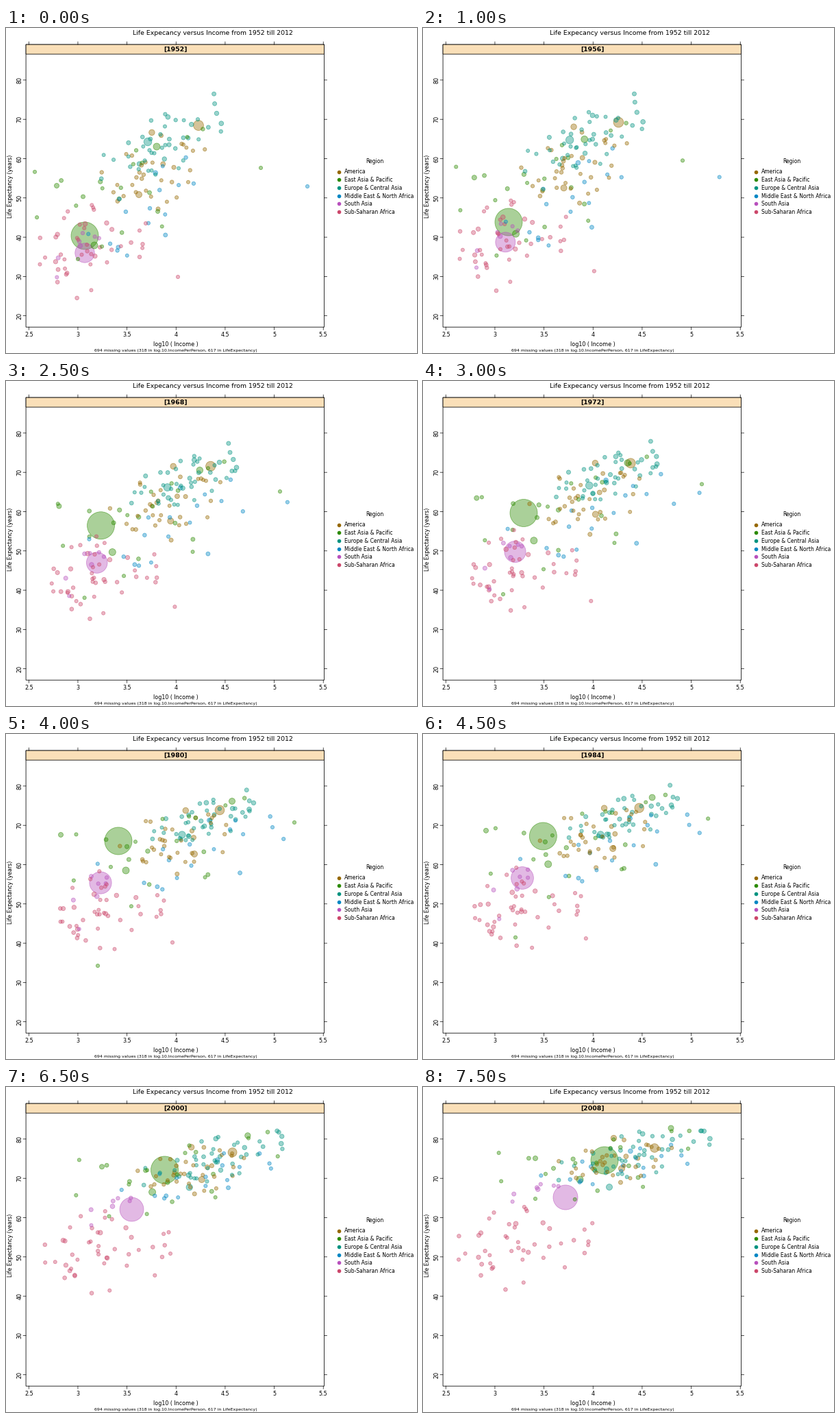
A matplotlib script for the animation above (8 s loop, 600 by 474 pixels).

```python
import numpy as np
import matplotlib.pyplot as plt
from matplotlib.animation import FuncAnimation
from matplotlib.colors import to_rgba
from matplotlib.patches import Rectangle

W, H, DPI = 600, 474, 100
PT = 72 / DPI  # points per pixel
FIRST, LAST, STEP = 1952, 2008, 4

plt.rcParams["font.family"] = "DejaVu Sans"
rng = np.random.default_rng(8)

AM, EA, EU = "#966900", "#2c8a00", "#009380"
ME, SA, AF = "#0087c4", "#b850bd", "#cc476b"
REGIONS = {
    "America": AM,
    "East Asia & Pacific": EA,
    "Europe & Central Asia": EU,
    "Middle East & North Africa": ME,
    "South Asia": SA,
    "Sub-Saharan Africa": AF,
}

bubbles = []  # (color, first radius, last radius, path function)


def between(year, keys):
    """Interpolate a {year: (x, y)} path, in stage pixels."""
    xs, ys = zip(*keys.values())
    years = list(keys)
    return np.array([np.interp(year, years, xs), np.interp(year, years, ys)])


def thirds(first, middle, last):
    return {FIRST: first, (FIRST + LAST) // 2: middle, LAST: last}


def track(color, radius, keys, last_radius=None):
    bubbles.append((color, radius, last_radius or radius,
                    lambda year: between(year, keys)))


def cloud(color, count, center, spread, tilt):
    """Seeded bubbles round a moving center; tilt links income and age."""
    for _ in range(count):
        zx, noise = np.clip(rng.normal(size=2), -1.9, 1.9)
        z = np.array([zx, tilt * zx + np.sqrt(1 - tilt ** 2) * noise])
        phase = rng.uniform(0, 2 * np.pi, 2)
        radius = 2.5 + min(rng.exponential(0.3), 2)

        def path(year, z=z, phase=phase):
            turn = 2 * np.pi * (year - FIRST) / (LAST - FIRST)
            wander = 0.15 * np.sin(phase + turn)
            x, y = between(year, center) + between(year, spread) * (z + wander)
            return x, max(y, 64)

        bubbles.append((color, radius, radius, path))


# Largest populations
track(EA, 20, {1952: (115, 303), 1956: (125, 283), 1960: (124, 356),
               1964: (130, 229), 1980: (164, 156), 1992: (198, 135),
               2008: (265, 107)})
track(SA, 14.2, {1952: (115, 328), 1964: (131, 281), 1980: (138, 217),
                 1992: (159, 196), 2008: (208, 161)}, 18)
track(AM, 7.4, thirds((281, 142), (312, 111), (338, 89)), 6.3)
track(AM, 4.5, thirds((194, 243), (275, 175), (290, 119)))
track(EU, 5.8, thirds((207, 166), (257, 147), (272, 146)), 4.5)
track(EA, 5, thirds((220, 173), (330, 98), (362, 60)), 4)
track(EA, 5, thirds((129, 317), (175, 199), (229, 135)))

# Outliers
track(ME, 2.6, thirds((440, 231), (389, 136), (386, 112)))
track(EA, 2.6, thirds((372, 204), (421, 129), (387, 90)))
track(EA, 3.5, thirds((74, 230), (80, 147), (164, 104)))
track(AF, 2.6, thirds((251, 363), (243, 304), (207, 263)))
track(EA, 2.6, {1952: (105, 337), 1972: (117, 311), 1976: (115, 419),
                1980: (134, 338), 1992: (137, 214), 2008: (164, 163)})

# Everyone else, by region
cloud(AM, 34, thirds((207, 217), (245, 160), (272, 112)),
      thirds((42, 38), (42, 29), (46, 22)), -0.6)
cloud(EA, 19, thirds((165, 245), (225, 172), (250, 118)),
      thirds((60, 45), (70, 42), (68, 28)), -0.5)
cloud(EU, 44, thirds((220, 168), (278, 126), (300, 97)),
      thirds((46, 32), (44, 19), (58, 24)), -0.65)
cloud(ME, 17, thirds((195, 270), (262, 175), (272, 117)),
      thirds((45, 55), (70, 40), (60, 22)), -0.5)
cloud(SA, 7, thirds((115, 325), (135, 235), (175, 152)),
      thirds((22, 38), (18, 42), (24, 15)), -0.2)
cloud(AF, 43, thirds((127, 318), (150, 258), (150, 228)),
      thirds((38, 36), (40, 30), (48, 32)), -0.25)

bubbles.sort(key=lambda b: -b[1])

fig = plt.figure(figsize=(W / DPI, H / DPI), dpi=DPI, facecolor="white")
ax = fig.add_axes([0, 0, 1, 1])
ax.set(xlim=(0, W), ylim=(H, 0))
ax.axis("off")


def label(x, y, text, size, ha="center", va="center", **kw):
    return ax.text(x, y, text, fontsize=size * PT, ha=ha, va=va, **kw)


def line(xs, ys):
    ax.plot(xs, ys, color="black", lw=0.7 * PT, snap=False, zorder=4)


def box(x0, y0, x1, y1, fill):
    ax.add_patch(Rectangle((x0, y0), x1 - x0, y1 - y0, facecolor=fill,
                           edgecolor="black", lw=0.8 * PT, snap=False, zorder=3))


LEFT, RIGHT, TOP, STRIP, BOTTOM = 29.1, 464.5, 24.1, 38.1, 436.2
TICK = 4
box(LEFT, TOP, RIGHT, BOTTOM, "none")
box(LEFT, TOP, RIGHT, STRIP, "#fadfb8")

for i in range(7):
    x, y = 33.3 + 71.65 * i, 419.7 - 57.3 * i
    line([x, x], [BOTTOM, BOTTOM + TICK])
    line([x, x], [TOP - TICK, TOP])
    label(x, 447.8, f"{2.5 + 0.5 * i:g}", 8)
    line([LEFT - TICK, LEFT], [y, y])
    line([RIGHT, RIGHT + TICK], [y, y])
    label(20, y, f"{20 + 10 * i}", 8, rotation=90)

label(302, 7, "Life Expecancy versus Income from 1952 till 2012", 9.41)
label(247.5, 461.6, "log10 ( Income )", 7.95)
label(6.3, 230.5, "Life Expectancy (years)", 7.9, rotation=90)
label(247.5, 470.8, "694 missing values (318 in log.10.IncomePerPerson, "
      "617 in LifeExpectancy)", 6.26)
label(538, 194.8, "Region", 7.7)
for i, (name, color) in enumerate(REGIONS.items()):
    y = 209.5 + 11.7 * i
    ax.scatter([486.4], [y], s=(5.6 * PT) ** 2, color=color, linewidths=0)
    label(494, y + 2.9, name, 7.67, ha="left", va="baseline")

year_text = label(247.5, 31.7, "", 9.4, weight="bold", zorder=5)
colors, first_radii, last_radii, paths = zip(*bubbles)
dots = ax.scatter(np.zeros(len(bubbles)), np.zeros(len(bubbles)), zorder=2,
                  facecolors=[to_rgba(c, 0.4) for c in colors],
                  edgecolors=[to_rgba(c, 0.55) for c in colors],
                  linewidths=0.8 * PT)


def update(frame):
    year = FIRST + STEP * max(0, frame - 1)  # the first year is held twice as long
    part = (year - FIRST) / (LAST - FIRST)
    radii = (1 - part) * np.array(first_radii) + part * np.array(last_radii)
    dots.set_offsets([path(year) for path in paths])
    dots.set_sizes((2 * radii * PT) ** 2)
    year_text.set_text(f"[{year}]")
    return dots, year_text


anim = FuncAnimation(fig, update, frames=16, interval=500, repeat=True)
plt.show()
```
